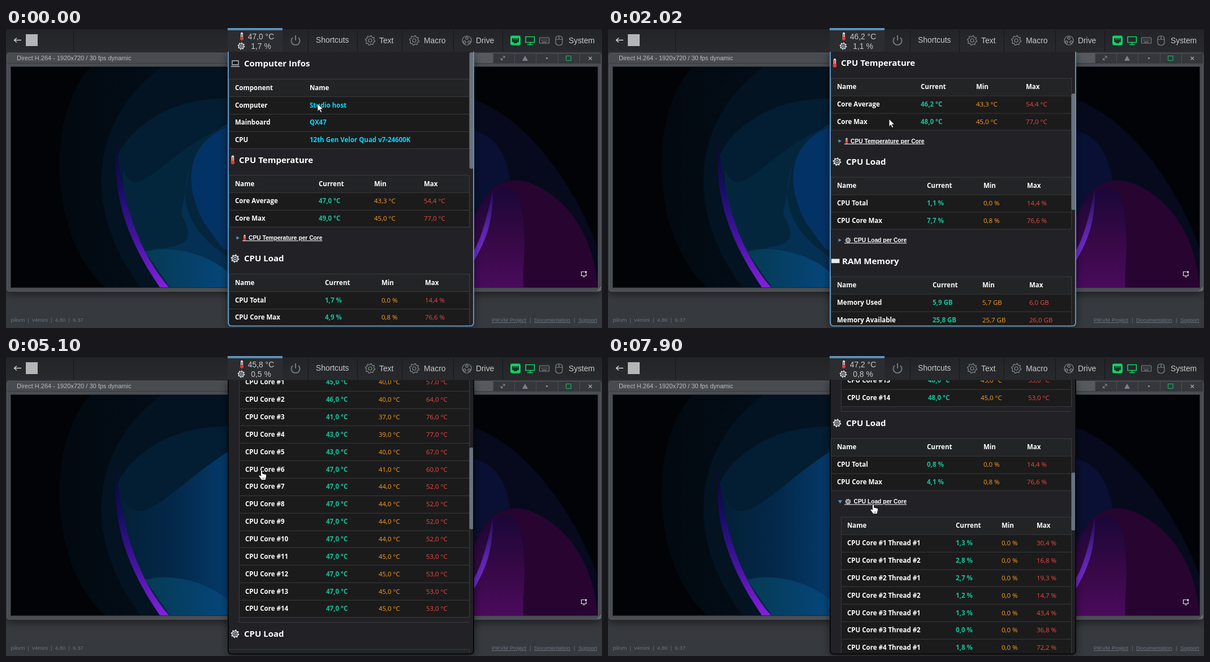
An HTML page that plays this animation: 1054x531 px, repeating every 8 s.

```html
<!DOCTYPE html>
<html lang="en">
<head>
<meta charset="utf-8">
<title>Computer infos panel</title>
<style>
html, body { margin: 0; width: 100%; height: 100%; overflow: hidden; background: #36393e; }
svg { display: block; width: 100vw; height: 100vh; font-family: "Liberation Sans", Arial, sans-serif; }
text { white-space: pre; }
.nav { font-size: 13.85px; fill: #c8cacc; }
.small { font-size: 9.5px; fill: #6b7480; }
.link { text-decoration: underline; }
.cell { font: 11.5px "Open Sans", "Noto Sans", sans-serif; }
.bold { font-weight: 700; }
.head { font: 700 15px "Open Sans", "Noto Sans", sans-serif; fill: #fff; }
.summary { font-size: 10.22px; font-weight: 700; fill: #fff; text-decoration: underline; }
.line { stroke: #393c3f; fill: none; }
.icon { fill: none; stroke: #85888b; stroke-width: 1.2; }
</style>
</head>
<body>
<svg id="stage" viewBox="0 0 1054 531" preserveAspectRatio="none"></svg>
<script>
const LOOP = 8000, ROW = 30.85, NOTCH = 85.7;
const VIEW_TOP = 43, VIEW = 484, CONTENT = 1137;
const TEMP_GROWTH = 482, LOAD_GROWTH = 667;
const WHITE = '#fff', TEAL = '#15c39a', ORANGE = '#ff9f1c', RED = '#f04a3e', CYAN = '#00dcff';

const text = (x, y, s, cls, extra = '') => `<text x="${x}" y="${y}" class="${cls}" ${extra}>${s}</text>`;
const rect = (x, y, w, h, fill, extra = '') => `<rect x="${x}" y="${y}" width="${w}" height="${h}" fill="${fill}" ${extra}/>`;
const path = (d, fill, extra = '') => `<path d="${d}" fill="${fill}" ${extra}/>`;
const line = (x1, y1, x2, y2, extra = 'class="line"') => `<path d="M${x1} ${y1}L${x2} ${y2}" ${extra}/>`;

function gearPath(cx, cy, r) {
  const points = [];
  for (let i = 0; i < 32; i++) {
    const radius = i % 4 < 2 ? r : r * 0.78, a = (i + 0.5) * Math.PI / 16;
    points.push(`${(cx + radius * Math.cos(a)).toFixed(2)} ${(cy + radius * Math.sin(a)).toFixed(2)}`);
  }
  return `M${points.join('L')}Z`;
}
const solidGear = (x, y, r) => path(gearPath(x, y, r), '#d9dcdf') +
  `<circle cx="${x}" cy="${y}" r="${r * 0.48}" fill="#b9bec3" stroke="#25282b" stroke-width="${r * 0.17}"/>` +
  `<circle cx="${x}" cy="${y}" r="${r * 0.2}" fill="#25282b"/>`;
const outlineGear = (x, y) => `<g class="icon"><path d="${gearPath(x, y, 8.5)}"/><circle cx="${x}" cy="${y}" r="3"/></g>`;
const thermometer = (x, y, k = 1) => `<g transform="translate(${x} ${y}) scale(${k})">` +
  rect(-2.2, -8, 4.4, 12, '#e4e9ee', 'rx="2.2"') + rect(-1, -5, 2, 9, '#e33b2e') +
  '<circle cy="4.3" r="3.4" fill="#e33b2e"/></g>';

function table(x, top, cols, rows) {
  const bottom = top + ROW * rows.length;
  let out = rect(x, top, 819 - x, ROW, '#222426') + rect(x, top + ROW, 819 - x, bottom - top - ROW, '#1b1b1c');
  rows.forEach((row, i) => {
    const y = top + ROW * i;
    out += line(x, Math.round(y) + 0.5, 819, Math.round(y) + 0.5);
    cols.forEach((cx, c) => {
      const info = cols.length === 2;
      const fill = !i || !c ? WHITE : info ? CYAN : [TEAL, ORANGE, RED][c - 1];
      const bold = !i || c < 2 ? 'bold' : '';
      const key = i && c === 1 && row[4] ? `data-key="${row[4]}"` : '';
      out += text(cx, (y + 19.7).toFixed(1), row[c], `cell ${bold}`, `fill="${fill}" ${key}`);
    });
  });
  return out + `<path class="line" d="M${x} ${bottom}H819.5V${top}"/>` + line(x + 0.5, top, x + 0.5, bottom);
}
const heading = (x, y, s) => text(x, y + 5, s, 'head');
const summary = (x, y, s, id) =>
  `<path id="${id}" fill="#5b93bd"/>` + line(418, y + 5.2, x, y + 5.2, 'stroke="#fff"') + text(x, y + 3.7, s, 'summary');

const HEADER = ['Name', 'Current', 'Min', 'Max'];
const num = v => v.toFixed(1).replace('.', ',');
const deg = v => `${num(v)} °C`, pct = v => `${num(v)} %`, gb = v => `${num(v)} GB`;
const measure = (unit, name, cur, min, max, key) => [name, unit(cur), unit(min), unit(max), key];

const coreMin = [40, 40, 37, 39, 40, 41, 44, 44, 44, 44, 45, 45, 45, 45];
const coreMax = [57, 64, 76, 77, 67, 60, 52, 52, 52, 52, 53, 53, 53, 53];
const coreRows = coreMin.map((min, i) => measure(deg, `CPU Core #${i + 1}`, 47, min, coreMax[i], `core${i}`));
const threadRows = [[1.3, 30.4], [2.8, 16.8], [2.7, 19.3], [1.2, 14.7], [1.3, 43.4], [0, 36.8], [1.8, 72.2]]
  .map(([cur, max], i) => measure(pct, `CPU Core #${(i >> 1) + 1} Thread #${i % 2 + 1}`, cur, 0, max));

function navBar() {
  let out = rect(0, 0, 1054, 42, 'url(#bar)') + rect(0, 0, 1054, 2, '#15171c') + rect(392, 0, 97, 42, '#2b2d30') + rect(392, 0, 97, 4, '#5b8fb8');
  for (const x of [119, 534, 621, 700, 791, 878]) out += line(x + 0.5, 4, x + 0.5, 42, 'stroke="#15171a"');
  out += path('M27 21.5H15M19 17.5L14.5 21.5L19 25.5', 'none', 'stroke="#d0d2d4" stroke-width="1.4"');
  out += rect(35, 11, 21, 21, '#b3b5b6');
  out += thermometer(417, 15, 0.9) + solidGear(416, 32, 6.5);
  out += text(451, 19.5, '', 'nav', 'text-anchor="middle" data-key="temp"');
  out += text(451, 37, '', 'nav', 'text-anchor="middle" data-key="load"');
  out += path('M507 17A7.5 7.5 0 1 0 517 17M512 13V22', 'none', 'stroke="#74777a" stroke-width="2"');
  [[548, 'Shortcuts'], [660, 'Text'], [739, 'Macro'], [831, 'Drive'], [995, 'System']]
    .forEach(([x, s]) => out += text(x, s === 'Shortcuts' ? 26 : 26.5, s, 'nav'));
  out += outlineGear(644, 22) + outlineGear(722, 22);
  out += '<g class="icon"><circle cx="815" cy="22" r="8"/><circle cx="815" cy="18" r="2.2"/><circle cx="811" cy="25" r="2.2"/><circle cx="819" cy="25" r="2.2"/></g>';
  out += rect(892, 13.5, 18, 17, '#08d765', 'rx="3"') + path('M895 18h12v7h-3v2h-6v-2h-3z', '#173524') + path('M898 18v3M901 18v3M904 18v3', 'none', 'stroke="#08d765"');
  out += path('M919 15.5h15.5v10h-15.5zM926.7 26v3M922 29.5h9.5', 'none', 'stroke="#08d765" stroke-width="1.6"');
  out += '<g class="icon"><rect x="943.5" y="17" width="17" height="10" rx="1"/><path d="M946 20h12M946 22.5h12" stroke-dasharray="1.5 1"/><path d="M948 25h8"/><rect x="972" y="14" width="12" height="16.5" rx="5"/><path d="M972 20h12M978 14v6"/></g>';
  return out;
}

function videoPicture() {
  return `<g clip-path="url(#screen)">` + rect(9, 69, 1037, 390, '#010306') +
    path('M150 69C70 150 75 370 175 459H400V69Z', 'url(#navy)') +
    path('M275 69C140 170 140 330 238 459H400V69Z', '#031321') +
    path('M400 125C270 120 200 200 195 235C200 350 245 410 285 459H400Z', '#031d32') +
    path('M207 250C235 320 300 225 400 165V459H280C230 400 205 320 207 250Z', 'url(#blue)') +
    `<g id="flat">` + path('M207 250C230 320 285 210 400 170V459H280C225 400 205 320 207 250Z', '#04263d') +
    path('M400 172C330 195 305 260 350 345L385 392H400Z', '#033266') + path('M325 245C300 320 335 370 400 410V459H300L245 395C300 385 345 390 310 330Z', '#043054') + `</g>` +
    path('M246 396C300 382 370 405 400 440V459H290Z', 'url(#teal)') +
    path('M195 198C187 300 215 375 272 459H288C235 397 205 310 195 198Z', 'url(#swoosh)') +
    path('M820 125C915 150 1010 280 1050 400V459H820Z', '#060a1c') +
    path('M820 180C895 195 905 270 890 459H820Z', '#0a1033') +
    path('M820 350C850 275 890 255 940 280C1010 315 1042 390 1046 459H820Z', '#270530') +
    path('M820 350C850 285 890 265 907 300C925 370 912 420 915 459H820Z', 'url(#purple)') +
    path('M820 405C836 385 848 350 861 285C862 345 848 380 820 425Z', 'url(#ray)') + `</g>` +
    path('M1017.5 431.5h6M1017.5 431v7.5h8.5v-4M1020 440.5h4', 'none', 'stroke="#e8e8e8" stroke-width="1.2"') + rect(1024, 430.5, 3, 3, '#e8e8e8');
}

function videoWindow() {
  let out = rect(1.5, 44.5, 1051, 421.5, '#4a4d52', 'rx="4" stroke="#5a5e63" filter="url(#shadow)"') +
    rect(2, 45, 1050, 17.5, '#484b50') + rect(828, 45, 33, 17, '#56595e') + rect(861, 45, 191, 17, '#34373b');
  out += line(2, 62.5, 1052, 62.5, 'stroke="#36393d"') + rect(8.5, 68.5, 1038, 391, 'none', 'stroke="#24272b"');
  for (const x of [861, 899, 937, 976, 1014]) out += line(x + 0.5, 45, x + 0.5, 62, 'stroke="#4a4d51"');
  out += path('M876 56L882 50M878.5 50H882V53.5M875.5 53V56.5H879', 'none', 'stroke="#8f9296"') + path('M913 58L918 49L923 58Z', '#7e8286');
  out += '<circle cx="956.5" cy="53.5" r="1.6" fill="#92959a"/>' + rect(990.5, 49.5, 8.5, 8, 'none', 'stroke="#20a35a" stroke-width="1.3"');
  out += path('M1030.5 51L1036 56.5M1036 51L1030.5 56.5', 'none', 'stroke="#a8abae" stroke-width="1.2"');
  out += text(19, 57, '', 'title', 'font-size="11" fill="#b9bcc0" data-key="title"');
  return out + videoPicture() + path('M1046 465L1052 459M1049 465L1052 462', 'none', 'stroke="#9a9da0"');
}

function panelContent() {
  const laptop = path('M400 58h11v7h-11zM398 68h15', '#15181b', 'stroke="#b8bec4" stroke-width="1.4"');
  const floppy = rect(398, 717.5, 14, 14, '#555b61', 'rx="1"') + rect(401, 718, 8, 5, '#c9ced3') + rect(400, 725, 10, 6.5, '#eceff1');
  const storage = floppy + heading(420, 724.4, 'Storage: Nolt SSD K3000 4TB (NVMe)') +
    table(394, 750, [405, 553, 654, 736], [HEADER, measure(deg, 'Temperature', 44, 0, 45)]);
  const ram = rect(395, 580, 14.5, 7.5, '#e9ebed') + heading(414, 584, 'RAM Memory') +
    table(394, 610.8, [405, 574, 662, 745], [HEADER, measure(gb, 'Memory Used', 5.9, 5.7, 6), measure(gb, 'Memory Available', 25.8, 25.7, 26)]);
  const load = solidGear(405, 408, 7.5) + heading(421, 408, 'CPU Load') +
    table(394, 435, [405, 564, 664, 741], [HEADER, measure(pct, 'CPU Total', 0, 0, 14.4, 'load'), measure(pct, 'CPU Core Max', 0, 0.8, 76.6, 'loadMax')]) +
    solidGear(424.5, 547, 5) + summary(434.5, 547, 'CPU Load per Core', 'loadMark') +
    `<g id="threads">${table(412, 574, [423, 615, 696, 758], [HEADER, ...threadRows])}</g>`;
  return laptop + heading(421, 63, 'Computer Infos') +
    table(394, 90, [405, 537], [['Component', 'Name'], ['Computer', 'Studio host'], ['Mainboard', 'QX47'], ['CPU', '12th Gen Velor Quad v7-24600K']]) +
    thermometer(401, 233.5) + heading(412, 233.5, 'CPU Temperature') +
    table(394, 259.8, [405, 553, 651, 739], [HEADER, measure(deg, 'Core Average', 0, 43.3, 54.4, 'temp'), measure(deg, 'Core Max', 0, 45, 77, 'tempMax')]) +
    thermometer(422, 371.5, 0.7) + summary(429, 371.5, 'CPU Temperature per Core', 'tempMark') +
    `<g id="cores">${table(412, 398, [423, 566, 659, 743], [HEADER, ...coreRows])}${line(412, 869.5, 819, 869.5)}${line(412.5, 860, 412.5, 869.5)}</g>` +
    `<g id="afterTemp">${load}<g id="afterLoad">${ram}${storage}</g></g>`;
}

const gradient = (id, dir, ...stops) => `<linearGradient id="${id}" ${dir}>` +
  stops.map((c, i) => `<stop offset="${i / (stops.length - 1)}" stop-color="${c}"/>`).join('') + '</linearGradient>';
const DOWN = 'x2="0" y2="1"';
const panelShape = 'M393 42V521Q393 527.5 399.5 527.5H820.5Q827 527.5 827 521V42';

document.getElementById('stage').innerHTML = '<defs>' +
  gradient('bar', DOWN, '#212326', '#25272a', '#27292c') + gradient('navy', '', '#020910', '#04101d') +
  gradient('blue', '', '#032138', '#04294b', '#033c6e') + gradient('teal', '', '#053b52', '#064069', '#04477c') +
  gradient('swoosh', DOWN, '#070a2c', '#170d67', '#4514a0', '#8420dc') + gradient('purple', DOWN, '#1a0738', '#360845', '#490b5c') +
  gradient('ray', DOWN, '#200b52', '#5925a9', '#7e2fe0') +
  '<clipPath id="screen"><rect x="9" y="69" width="1037" height="390"/></clipPath>' +
  '<clipPath id="view"><path d="M394 43H826V521Q826 526.5 820 526.5H400Q394 526.5 394 521Z"/></clipPath>' +
  '<filter id="shadow" x="-10%" y="-10%" width="120%" height="120%"><feDropShadow dx="0" dy="4" stdDeviation="8" flood-opacity=".55"/></filter></defs>' +
  rect(0, 0, 1054, 531, '#36393e') + videoWindow() +
  text(8.5, 520, 'pikvm  |  v4mini  |  4.80  |  6.37', 'small') +
  text(859, 520, 'PiKVM Project', 'small link') + text(926, 520, '|', 'small') +
  text(934, 520, 'Documentation', 'small link') + text(1004, 520, '|', 'small') + text(1012, 520, 'Support', 'small link') +
  path(panelShape, '#212325', 'filter="url(#shadow)"') + navBar() +
  `<g clip-path="url(#view)"><g id="content">${panelContent()}</g><rect id="thumb" x="819.5" width="7" rx="3" fill="#68727e"/></g>` +
  path(panelShape, 'none', 'id="border" stroke-width="2"') +
  `<g id="arrow">${path('M0 0V13.5L3.2 10.6L5.4 15.6L7.7 14.6L5.5 9.8H9.7Z', '#fff', 'stroke="#111" stroke-width=".9"')}</g>` +
  `<g id="hand">${path('M-1.5 1Q0-1 1.5 1V6L7.5 7.5Q9 8 8.6 10L7 17.5H0L-5 10.5Q-5 8.5-3 9L-1.5 10.5Z', '#fff', 'stroke="#111" stroke-width=".9"')}${path('M2 13V16M4.3 13V16', 'none', 'stroke="#333" stroke-width=".7"')}</g>`;

const $ = id => document.getElementById(id);
const keyed = [...document.querySelectorAll('[data-key]')];

// time, average temperature, total load, hottest core, busiest core
const readings = [
  [0, 47, 1.7, 49, 4.9], [900, 46.2, 0, 49, 5.5], [1900, 46.2, 1.1, 48, 7.7], [3900, 46, 0.8, 48, 5.2],
  [4900, 45.8, 0.5, 47, 4.8], [5900, 46.5, 0.6, 48, 5.5], [6900, 46.8, 0.7, 48, 4.8], [7760, 47.2, 0.8, 48, 4.1]
];
const coreReadings = [
  [0, 44, 46, 41, 44, 45], [3900, 45, 46, 41, 43, 43]
];
const scrollSteps = [[0, 0], [660, 0], [880, NOTCH], [1560, NOTCH], [1780, 2 * NOTCH], [4560, 2 * NOTCH], [5100, 398],
  [5240, 5 * NOTCH], [5530, 5 * NOTCH], [6380, 9 * NOTCH], [LOOP, 9 * NOTCH]];
const pointerSteps = [[0, 551, 134], [550, 551, 134], [1250, 530, 130], [1700, 528, 132], [2020, 497, 161], [2160, 497, 161],
  [2800, 450, 204], [3400, 450, 204], [4500, 452, 202], [5600, 452, 202], [6100, 454, 207], [6660, 454, 207], [7300, 469, 262], [LOOP, 469, 262]];

const latest = (steps, t) => steps.filter(s => s[0] <= t).pop();
const within = (t, ...spans) => spans.some(([a, b]) => t >= a && t < b);
function tween(steps, t) {
  const i = Math.max(1, steps.findIndex(s => s[0] > t)), a = steps[i - 1], b = steps[i];
  const p = (t - a[0]) / (b[0] - a[0]);
  return a.slice(1).map((v, k) => v + (b[k + 1] - v) * p);
}
const show = (id, on) => $(id).setAttribute('display', on ? 'inline' : 'none');
const move = (id, x, y) => $(id).setAttribute('transform', `translate(${x} ${y})`);
const mark = (id, y, open) => $(id).setAttribute('d', open ? `M407 ${y - 2.5}h7l-3.5 6z` : `M407.5 ${y - 3}v6l5.5-3z`);

function render(t) {
  const [, temp, load, tempMax, loadMax] = latest(readings, t);
  const values = { temp: deg(temp), load: pct(load), tempMax: deg(tempMax), loadMax: pct(loadMax),
    title: `Direct H.264 - 1920x720 / ${within(t, [5900, 6900]) ? 22 : 30} fps dynamic` };
  const cores = latest(coreReadings, t);
  coreRows.forEach((_, i) => values[`core${i}`] = deg(cores[i + 1] || (t >= 5900 && i > 11 ? 48 : 47)));
  for (const el of keyed) {
    const s = values[el.dataset.key];
    if (el.textContent !== s) el.textContent = s;
  }
  const tempOpen = t >= 3040, loadOpen = t >= 7700;
  show('cores', tempOpen);
  show('threads', loadOpen);
  mark('tempMark', 371.5, tempOpen);
  mark('loadMark', 547, loadOpen);
  move('afterTemp', 0, tempOpen ? TEMP_GROWTH : 0);
  move('afterLoad', 0, loadOpen ? LOAD_GROWTH : 0);

  const [scroll] = tween(scrollSteps, t);
  const ratio = VIEW / (CONTENT + tempOpen * TEMP_GROWTH + loadOpen * LOAD_GROWTH);
  move('content', 0, -scroll);
  $('thumb').setAttribute('y', VIEW_TOP + scroll * ratio);
  $('thumb').setAttribute('height', VIEW * ratio);
  $('border').setAttribute('stroke', !tempOpen || within(t, [7600, 7700]) ? '#5b93bd' : '#08090a');

  const [x, y] = tween(pointerSteps, t), pointing = within(t, [2650, 5600], [7150, LOOP]);
  show('hand', pointing);
  show('arrow', !pointing);
  move('hand', x, y);
  move('arrow', x, y);
  show('flat', within(t, [0, 600], [1740, 2700], [5900, 6900]));
}
const start = performance.now();
function tick() {
  render((performance.now() - start) % LOOP);
  requestAnimationFrame(tick);
}
tick();
</script>
</body>
</html>
```
